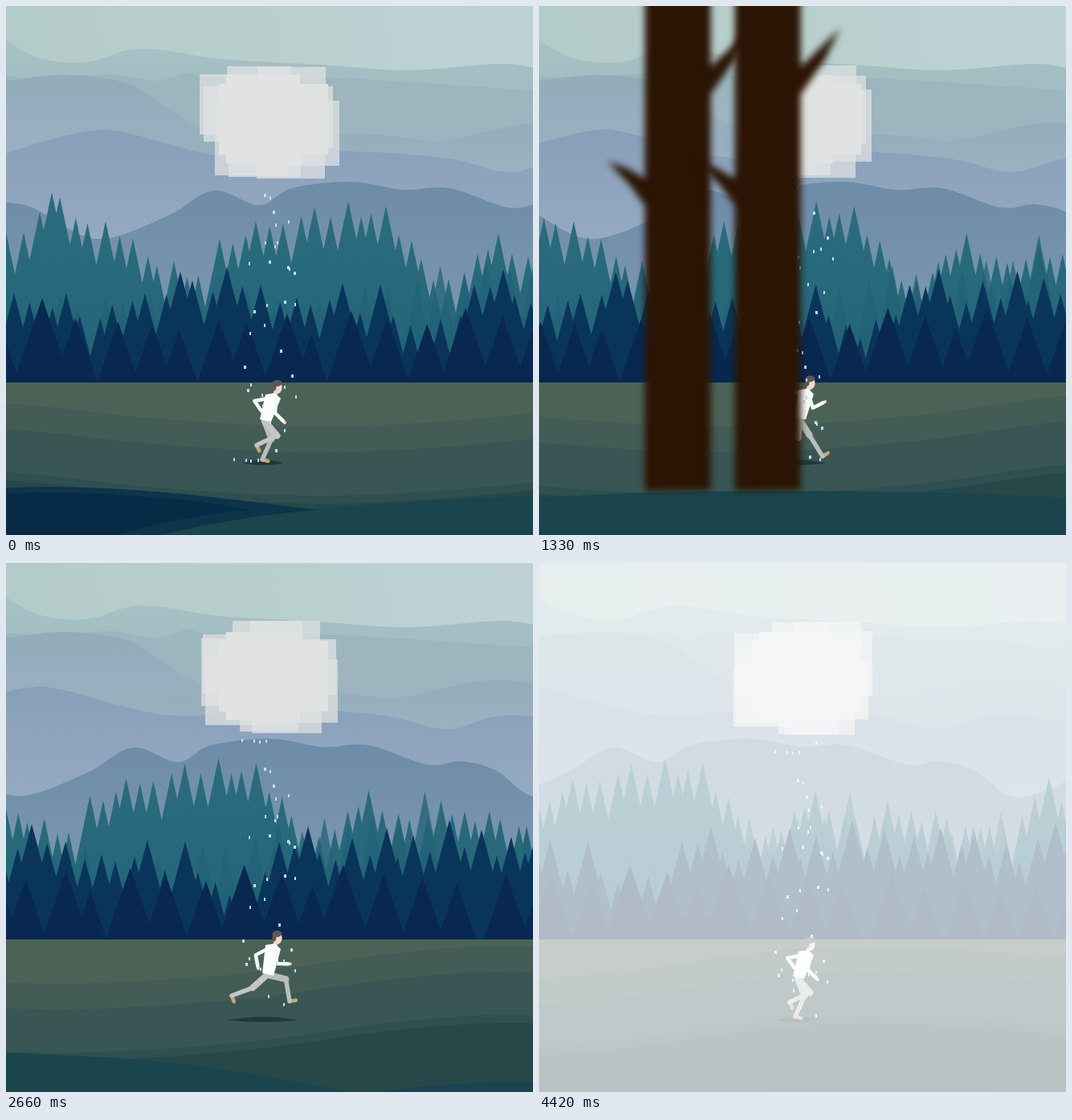
Recreate the animation shown at these times as an HTML page with a canvas. Size 656 by 659 pixels, loop 4.52 s.

```html
<!DOCTYPE html>
<html lang="en">
<head>
<meta charset="utf-8">
<title>Running under a rain cloud</title>
<style>
html, body { margin: 0; width: 656px; height: 659px; overflow: hidden; background: #b9cfcf; }
canvas { display: block; }
</style>
</head>
<body>
<canvas id="stage" width="656" height="659"></canvas>
<script>
const W = 656, H = 659, HORIZON = 469, LOOP = 4520, STEPS = 31, TAU = Math.PI * 2;
const ctx = document.getElementById('stage').getContext('2d');

// The picture changes in steps of 150 ms, a few of them shorter.
const shortSteps = [4, 8, 14, 16, 22, 24, 28, 29];
const starts = [0];
for (let i = 0; i < STEPS - 1; i++) starts.push(starts[i] + (shortSteps.includes(i) ? 140 : 150));

const clamp = (v, lo, hi) => Math.min(hi, Math.max(lo, v));
const lerp = (a, b, k) => a + (b - a) * k;
const mix = (p, q, k) => [lerp(p[0], q[0], k), lerp(p[1], q[1], k)];
const rnd = n => { const v = Math.sin(n * 127.1 + 11.7) * 43758.5453; return v - Math.floor(v); };

function vertical(y0, y1, top, bottom) {
  const g = ctx.createLinearGradient(0, y0, 0, y1);
  g.addColorStop(0, top);
  g.addColorStop(1, bottom);
  return g;
}

// Smooth line through a few points
function curve(points, dx = 0, dy = 0) {
  const at = i => points[clamp(i, 0, points.length - 1)];
  ctx.moveTo(points[0][0] + dx, points[0][1] + dy);
  for (let i = 0; i < points.length - 1; i++) {
    const [p, a, b, n] = [at(i - 1), at(i), at(i + 1), at(i + 2)];
    ctx.bezierCurveTo(
      a[0] + (b[0] - p[0]) / 6 + dx, a[1] + (b[1] - p[1]) / 6 + dy,
      b[0] - (n[0] - a[0]) / 6 + dx, b[1] - (n[1] - a[1]) / 6 + dy,
      b[0] + dx, b[1] + dy);
  }
}

function hill(points, fill, dx = 0, dy = 0) {
  ctx.beginPath();
  curve(points, dx, dy);
  ctx.lineTo(points[points.length - 1][0] + dx, H + 80);
  ctx.lineTo(points[0][0] + dx, H + 80);
  ctx.closePath();
  ctx.fillStyle = fill;
  ctx.fill();
}

// Mountains
const farRange = [[-10, 36], [40, 64], [100, 70], [168, 53], [268, 66], [390, 73], [500, 80], [615, 72], [666, 79]];
const hazeRange = [[-10, 86], [45, 90], [130, 85], [187, 93], [227, 83], [260, 89], [420, 90], [666, 106]];
const slopeRange = [[-10, 95], [70, 86], [150, 96], [205, 130], [250, 154], [340, 185]];
const blueRange = [[-20, 185], [300, 166], [450, 160], [538, 168], [600, 156], [660, 146], [720, 151], [790, 168]];
const violetRange = [[-20, 190], [50, 168], [110, 155], [150, 158], [286, 190], [420, 181], [550, 190],
  [628, 207], [700, 190], [800, 199]];
const nearRange = [[-20, 245], [30, 250], [112, 290], [200, 262], [258, 230], [315, 248], [356, 227], [430, 219],
  [495, 229], [552, 227], [625, 251], [667, 247], [710, 258], [765, 292], [850, 260]];

function drawSky(f) {
  const sky = ctx.createLinearGradient(0, 100, W, 0);
  sky.addColorStop(0, '#b3cbc8');
  sky.addColorStop(0.5, '#b9cfcd');
  sky.addColorStop(1, '#bed2d5');
  ctx.fillStyle = sky;
  ctx.fillRect(0, 0, W, H);
  hill(farRange, vertical(45, 110, '#a6c2c5', '#a1bcc2'));
  hill(hazeRange, vertical(84, 180, '#9bb6be', '#9eb4c0'));
  hill(slopeRange, vertical(85, 180, '#92acba', '#9ab0c0'));
  hill(blueRange, vertical(146, 200, '#94adbb', '#9bb1c0'), -3.2 * f);
  hill(violetRange, vertical(155, 290, '#889fb9', '#95aac1'), -4.45 * f);
  hill(nearRange, vertical(220, 340, '#6d8ca7', '#7893ad'), -5.6 * f);
}

// Forest rows: tall landmark trees with lower ones strewn evenly between them
function forest(landmarks, gap, drop) {
  const trees = [];
  landmarks.forEach((a, i) => {
    trees.push(a);
    const b = landmarks[i + 1];
    if (!b) return;
    const n = Math.round((b[0] - a[0]) / gap);
    for (let j = 1; j < n; j++) {
      const seed = a[0] + j * 7, [x, y] = mix(a, b, j / n);
      trees.push([x + (rnd(seed) - 0.5) * gap * 0.5, y + drop * (0.3 + rnd(seed + 3))]);
    }
  });
  return trees;
}

const tealBack = forest([[0, 282], [57, 232], [67, 238], [124, 268], [158, 290], [209, 318], [258, 330], [266, 290],
  [311, 268], [384, 250], [426, 243], [473, 249], [505, 292], [551, 340], [587, 309], [613, 283], [650, 312],
  [703, 296], [763, 309], [830, 328], [904, 266], [940, 300]], 17, 14);
const tealFront = forest([[0, 345], [300, 350], [723, 285], [760, 350], [911, 310], [1020, 340]], 30, 24);
const navyBack = forest([[-12, 372], [10, 358], [75, 358], [173, 358], [217, 331], [275, 325], [317, 347], [419, 345],
  [466, 347], [541, 390], [583, 347], [619, 328], [674, 342], [717, 330], [750, 339], [795, 320], [835, 332],
  [905, 330], [947, 335], [987, 350], [1048, 322], [1080, 360]], 20, 28);
const navyFront = forest([[-10, 390], [45, 364], [265, 390], [350, 383], [430, 380], [572, 376], [695, 376], [1130, 380]], 46, 22);

function spikes(trees, slope, dx) {
  ctx.beginPath();
  for (const [x, y] of trees) {
    const half = (HORIZON - y) / slope;
    ctx.moveTo(x + dx, y);
    ctx.lineTo(x + dx + half, HORIZON);
    ctx.lineTo(x + dx - half, HORIZON);
    ctx.closePath();
  }
}

function row(trees, slope, fill, dx) {
  spikes(trees, slope, dx);
  ctx.fillStyle = fill;
  ctx.fill();
}

function drawForest(f) {
  const back = -8.97 * f;
  row(tealBack, 4.7, vertical(232, 440, '#2b6d7e', '#246579'), back);
  row(tealFront, 5, 'rgba(33,98,118,.75)', -11.2 * f);
  ctx.save();
  spikes(tealBack, 4.7, back);
  ctx.clip();
  ctx.fillStyle = 'rgba(70,128,135,.22)';
  for (let i = 0; i < 2200; i++) ctx.fillRect(Math.round(rnd(i) * 940 + back), Math.round(245 + rnd(i + 0.5) * 170), 1, 1);
  ctx.restore();
  row(navyBack, 3.8, '#0a355b', -13.5 * f);
  row(navyFront, 2.9, '#082852', -15.3 * f);
}

// Ground
const groundLine = [[-300, -42], [0, -29], [190, -10], [400, 0], [620, -13], [800, -37], [940, -47], [1100, -40], [1300, -22]];
const groundBands = [[524, '#435c55'], [556, '#3a5654'], [610, '#2f4f50'], [620, '#274749'], [694, '#1b4250']];
const bank = [[-50, 640], [250, 634], [390, 626], [469, 620], [719, 607], [924, 604], [1125, 607],
  [1204, 610], [1406, 622], [1616, 656], [1720, 690]];

function pool(tip, top, bottom, fill, dx) {
  ctx.beginPath();
  curve([[-80, top + 4], [70, top], [220, top + 9], [tip, 628]], dx);
  ctx.quadraticCurveTo(tip - 90 + dx, 634, tip - 200 + dx, bottom);
  ctx.lineTo(-80 + dx, bottom);
  ctx.closePath();
  ctx.fillStyle = fill;
  ctx.fill();
}

function drawGround(f) {
  ctx.fillStyle = '#4b6357';
  ctx.fillRect(0, HORIZON, W, H - HORIZON);
  for (const [y, color] of groundBands) hill(groundLine, color, -18 * f, y);
  const dx = -67 * f;
  hill(bank, '#1a454c', dx);
  pool(388, 599, 660, '#0d3449', dx);
  pool(305, 606, 668, '#072b47', dx);
}

// Cloud: a ring of loose squares, reshuffled every step, around a solid middle
function drawCloud(f) {
  const count = 9;
  ctx.fillStyle = 'rgba(226,228,228,.72)';
  for (let i = 0; i < count; i++) {
    const seed = f * 17 + i;
    const angle = (i + rnd(seed) * 0.8) / count * TAU;
    const size = 68 + 24 * rnd(seed + 0.3);
    const reach = 0.78 + 0.22 * rnd(seed + 0.6);
    const x = 328 + clamp(1.25 * Math.cos(angle), -1, 1) * reach * (88 - size / 2);
    const y = 143 + clamp(1.25 * Math.sin(angle), -1, 1) * reach * (73 - size / 2);
    ctx.fillRect(Math.round(x - size / 2), Math.round(y - size / 2), Math.round(size), Math.round(size));
  }
  ctx.fillStyle = '#e1e2e2';
  ctx.fillRect(265, 97, 136, 88);
  ctx.fillRect(274, 86, 92, 110);
}

function drawRain(f) {
  ctx.fillStyle = '#b9e0f2';
  for (let i = 0; i < 36; i++) {
    const y = 204 + (rnd(i + 3) * 365 + f * 62) % 365;
    const drift = Math.max(0, y - 420) * 0.07;
    ctx.fillRect(Math.round(287 + rnd(i + 70) * 79 - drift), Math.round(y), i % 3 ? 2 : 3, 4);
  }
}

// Runner: an ankle follows this closed path in ten steps; knees and elbows follow from the limb lengths
const anklePath = [[353, 561], [319, 565], [302, 563], [289, 558], [281, 539], [297, 527], [312, 547], [332, 550], [347, 547], [353, 546]];

function joint(from, to, upper, lower, side) {
  const dx = to[0] - from[0], dy = to[1] - from[1];
  const reach = Math.hypot(dx, dy), d = Math.min(reach, upper + lower);
  const along = (upper * upper - lower * lower + d * d) / (2 * d);
  const out = side * Math.sqrt(Math.max(0, upper * upper - along * along));
  return [from[0] + (dx * along + dy * out) / reach, from[1] + (dy * along - dx * out) / reach];
}

function line(color, width, ...points) {
  ctx.beginPath();
  points.forEach(p => ctx.lineTo(...p));
  ctx.strokeStyle = color;
  ctx.lineWidth = width;
  ctx.stroke();
}

function ellipse(color, x, y, rx, ry, turn = 0) {
  ctx.beginPath();
  ctx.ellipse(x, y, rx, ry, turn, 0, TAU);
  ctx.fillStyle = color;
  ctx.fill();
}

function leg(hip, ankle, color) {
  const knee = joint(hip, ankle, 24, 28, 1);
  const dx = ankle[0] - knee[0], dy = ankle[1] - knee[1], shin = Math.hypot(dx, dy);
  line('#c5a673', 4.5, ankle, [ankle[0] + 8 * dy / shin, Math.min(567, ankle[1] - 8 * dx / shin)]);
  line(color, 5.5, knee, ankle);
  line(color, 8, hip, knee);
}

function arm(shoulder, hand) {
  const elbow = joint(shoulder, hand, 16, 17, -1);
  line('#f0d3bd', 4, mix(elbow, hand, 0.6), hand);
  line('#f4f7f8', 4.5, shoulder, elbow, mix(elbow, hand, 0.8));
}

function drawRunner(f) {
  const dip = Math.max(0, Math.cos(f / 5 * TAU));
  const swing = (f % 5) / 4, top = 476 + 8 * dip;
  const hip = [325 - 3 * dip, 513 + 4 * dip];
  const spread = 43 - 18 * dip;
  ctx.lineCap = ctx.lineJoin = 'round';
  ctx.beginPath();
  ctx.moveTo(320 - spread, 569.5);
  ctx.quadraticCurveTo(320, 561, 320 + spread, 569.5);
  ctx.quadraticCurveTo(320, 574.5, 320 - spread, 569.5);
  ctx.fillStyle = 'rgba(28,52,52,.85)';
  ctx.fill();
  arm([325, top + 5], [319 - 16 * swing ** 4, 512 - 6 * Math.cos(f / 10 * TAU) - 16 * swing ** 4]);
  leg(hip, anklePath[(f + 1) % 10], '#b9bdbe');
  leg(hip, anklePath[(f + 6) % 10], '#c3c5c6');
  line('#f0d3bd', 5, [336, top - 4], [334, top + 3]);
  ctx.beginPath();
  ctx.moveTo(323, top);
  ctx.lineTo(335, top - 2);
  ctx.lineTo(342, top + 5);
  ctx.lineTo(hip[0] + 8, hip[1] + 1);
  ctx.lineTo(hip[0] - 6, hip[1] - 2);
  ctx.closePath();
  ctx.fillStyle = '#fbfcfc';
  ctx.fill();
  arm([336, top + 7], [347 + 9 * swing, 519 - 26 * swing]);
  ellipse('#f3d9c6', 339, top - 8, 4.5, 7, 0.15);
  ellipse('#5b5855', 337.5, top - 14, 6, 4, -0.1);
  ellipse('#5b5855', 334, top - 10, 2.5, 5);
}

// Blurred trunks passing close to the viewer
function trunkX(f) {
  if (f <= 4) return 473 + (4 - f) * 68;
  return f <= 7 ? lerp(473, 263, (f - 4) / 3) : 263 - (f - 7) * 65.6;
}

function trunk(x) {
  const shape = [[0, -30], [82, -30], [82, 76], [100, 58], [131, 28], [112, 67], [82, 110], [82, 603], [0, 604],
    [0, 249], [-18, 224], [-46, 194], [-22, 202], [0, 215]];
  ctx.beginPath();
  shape.forEach(([px, py]) => ctx.lineTo(x + px, py));
  ctx.closePath();
  ctx.fill();
}

function drawTrunks(f) {
  const x = trunkX(f);
  if (x > W + 50 || x < -270) return;
  ctx.save();
  ctx.filter = 'blur(4px)';
  ctx.fillStyle = '#2b1404';
  trunk(x);
  trunk(x + 112);
  ctx.restore();
}

function draw(f) {
  drawSky(f);
  drawForest(f);
  drawGround(f);
  drawCloud(f);
  drawRunner(f);
  drawRain(f);
  drawTrunks(f);
  ctx.fillStyle = `rgba(255,255,255,${clamp((f - 27.9) * 0.324, 0, 1)})`;
  ctx.fillRect(0, 0, W, H);
}

let shown = -1;
const origin = performance.now();
function tick() {
  const t = (performance.now() - origin) % LOOP;
  const f = starts.filter(s => s <= t).length - 1;
  if (f !== shown) draw(shown = f);
  requestAnimationFrame(tick);
}
tick();
</script>
</body>
</html>
```
